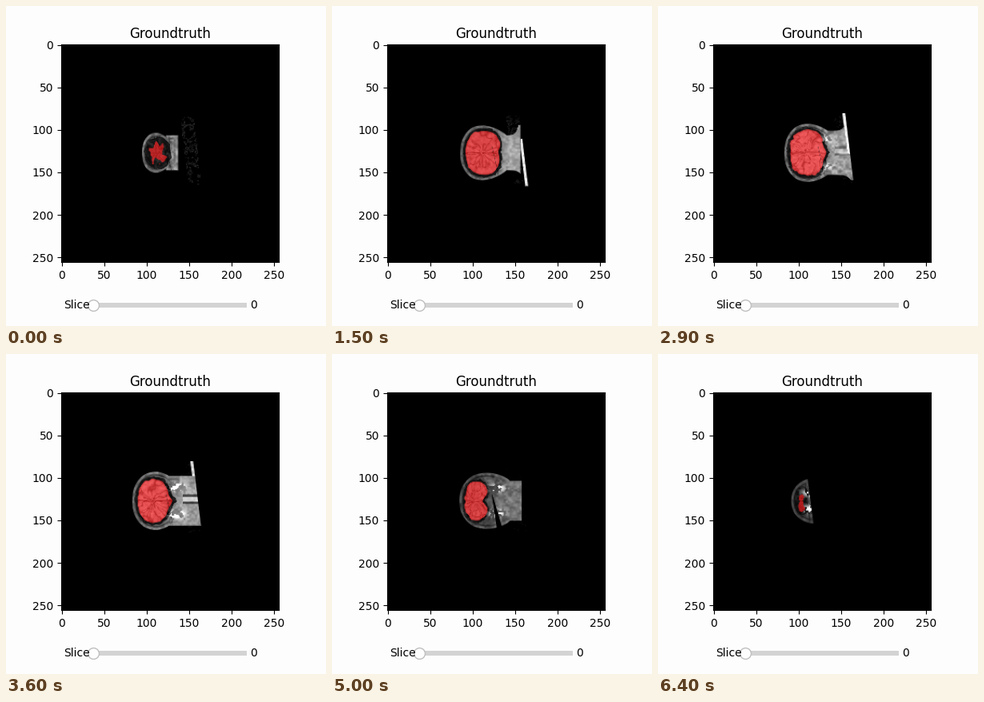
A matplotlib script that plays this animation: 400x400 px, repeating every 6.5 s.

```python
import numpy as np
import matplotlib.pyplot as plt
from matplotlib.animation import FuncAnimation
from matplotlib.patches import Rectangle

FRAMES, STEP = 65, 100
N, SCALE, LEFT, TOP = 256, 272 / 256, 69, 48      # image grid on the stage
MID = 183.5                                       # y of the symmetry line
PAPER = "#fdfdfd"

X, Y = np.meshgrid(LEFT + (np.arange(N) + .5) * SCALE,
                   TOP + (np.arange(N) + .5) * SCALE)
BOX = (slice(76, 172), slice(80, 172))            # the only part that changes
X, Y = X[BOX], Y[BOX]
EDGE = 234 + (Y - 135) * .124                     # slanted limit of the scan
LATTICE = np.random.default_rng(4).random((32, 32, 32))
GRAIN = np.random.default_rng(8).random((FRAMES,) + X.shape)


def ramp(t, start, end):
    u = np.clip((t - start) / (end - start), 0, 1)
    return u * u * (3 - 2 * u)


def key(t, *points):
    return np.interp(t, *zip(*points))


def soft(d):
    return np.clip(d + .5, 0, 1)


def bell(v, width):
    return np.exp(-(v / width) ** 2)


def noise(u, v, z):
    """Smooth random values on a repeating lattice."""
    cells = []
    for c in (u, v, np.full(X.shape, z)):
        i = np.floor(c).astype(int)
        f = c - i
        cells.append((i, f * f * (3 - 2 * f)))
    out = 0
    for corner in np.ndindex(2, 2, 2):
        w = 1
        for (i, f), b in zip(cells, corner):
            w = w * (f if b else 1 - f)
        out = out + w * LATTICE[tuple((i + b) % 32 for (i, f), b in zip(cells, corner))]
    return out


def oval(left, right, cx, half, power):
    """Distance inside an oval whose left and right halves differ in width."""
    dx, dy = X - cx, Y - MID
    wide = np.where(dx < 0, cx - left, right - cx)
    q = ((np.abs(dx) / wide) ** power + (np.abs(dy) / half) ** power) ** (1 / power)
    return np.hypot(dx, dy) * (1 / np.maximum(q, .01) - 1)


def neck_depth(t):
    grown, closed = ramp(t, 1000, 1900), ramp(t, 4500, 5600)
    half = 22 + 9 * ramp(t, 2100, 3500) - 14 * closed
    flare = 22 * grown * (1 - ramp(t, 2200, 3300))
    u = np.clip((X - 205) / (EDGE - 208), 0, 1)
    reach = 215 + 35 * grown - 30 * closed
    return np.minimum.reduce([half + flare * u ** 8 - np.abs(Y - MID), reach - X, X - 200])


def render(n):
    t = n * STEP
    z = t / 420
    fine = noise(X / 2.4, Y / 2.4, z * 1.6)
    mid = noise(X / 4.5 + 5.3, Y / 4.5, z)
    wide = noise(X / 10 + 9.1, Y / 10, z)
    shrink = abs(t / 3400 - 1) ** 2.8             # 1 at the start, 0 half way
    late = ramp(t, 4300, 5600)

    # outlines
    left = 158 + 12 * shrink
    right = key(t, (0, 211), (1000, 227), (2100, 238), (3600, 224), (5600, 240))
    slope = np.where(X < 190, 2.2, 1.7 + .5 * late)
    body = oval(left, right, 188 + 10 * late, 36.5 - 11.5 * shrink, slope)
    cut = 270 - 83 * ramp(t, 5500, 6400) + (Y - 155) * .13
    body = np.minimum.reduce([np.maximum(body, neck_depth(t)), EDGE - X, cut - X])

    brain_right = key(t, (0, 203), (1000, 209), (2100, 213), (3600, 203), (6400, 187))
    brain_half = key(t, (0, 17), (1000, 26), (2100, 30), (4400, 26), (5600, 23), (6400, 15))
    brain_left = left + 6.5
    cx = brain_left + .55 * (brain_right - brain_left)
    brain = oval(brain_left, brain_right, cx, brain_half, 2.4)
    notch = key(t, (0, 0), (1000, 4), (2100, 0), (3600, -5), (4400, 8), (5600, 4))
    brain = brain - notch * bell(Y - MID, 6) * (X > cx) + (mid - .5) * 2.5

    # scalp, skull and neck
    tissue = .5 - .2 * ramp(t, 4000, 5600)
    inner = np.clip((X - 195) / 25, 0, 1)
    gray = tissue * (.4 + .25 * inner + .5 * mid + .4 * fine)
    gray *= 1 - .5 * bell(body - 4.2, 1.1) * (1 - inner)
    gray += .2 * tissue * inner * bell(Y - MID, 22)
    gap = 3 + 3 * inner * ramp(t, 2400, 3600)
    shell = soft(brain + gap + (fine - .5) * 3)
    gray = gray * (1 - shell) + shell * (.03 + .2 * mid * fine)

    # bright spots either side of the spine
    spot_x = key(t, (2800, 208), (4400, 218), (5600, 193), (6400, 189))
    spot_y = 17 - 7 * ramp(t, 4400, 6400)
    spots = bell(X - spot_x, 9) * bell(np.abs(Y - MID) - spot_y, 4.5)
    gray += .9 * ramp(t, 2300, 3600) * spots * (fine + mid > 1)

    cord = bell(t - 3600, 800) * soft(X - 221)
    off = np.abs(Y - 181.5)
    gray *= 1 - .6 * cord * soft(6 - off)
    gray += .55 * cord * soft(3 - off)

    # dark wedge below the jaw
    wedge = ramp(t, 4600, 5500)
    drop = Y - 176
    slit = wedge * (1 + drop * .18) - np.abs(X - 200 - drop * .23)
    body = np.minimum(body, -np.minimum(slit, drop))
    gray = np.clip(gray, 0, 1) * soft(body)

    # loose specks and the bright shoulder rim
    amount = .16 * (1 - t / 6400)
    near = (X < EDGE) & (X > EDGE - 17) & (np.abs(Y - 180) < 43)
    loose = near & (fine * .6 + wide * .4 > .7 - amount)
    gray = np.maximum(gray, loose * amount * GRAIN[n])
    top = 198 - 64 * ramp(t, 1000, 2000)
    bottom = 225 - 72 * ramp(t, 2200, 3500)
    width = 3.5 * ramp(t, 300, 1300) * np.clip((Y - top) / 12 + ramp(t, 1000, 2000), 0, 1)
    rim = np.minimum.reduce([EDGE - X, X - EDGE + width, Y - top, bottom - Y])
    rim_light = (.8 + .3 * fine) * (1 - ramp(t, 3400, 4500)) * (width > .5)
    gray = np.maximum(gray, soft(rim) * rim_light)

    # red brain label over folds that run in from the surface
    dx, dy = X - cx + 3, Y - MID
    turn = np.arctan2(dy, dx) / (2 * np.pi) * 32
    rays = noise(turn + 2 * wide, np.hypot(dx, dy) / 8, z)
    folds = np.exp(-np.abs(rays - .45) / .07)
    matter = .78 - .4 * shrink - .2 * late
    matter *= 1.05 - .55 * folds + .3 * (fine - .5) - .25 * bell(dy - 3 * (wide - .5), 1.1)
    matter *= .65 + .35 * np.clip(brain / 2.5, 0, 1)
    matter = np.clip(matter, 0, 1)
    red = np.stack([.56 + .44 * matter, .41 * matter, .42 * matter], axis=2)
    patchy = 1 - ramp(t, 0, 600) + ramp(t, 5700, 6400)
    mask = soft(brain - patchy * (3 + 14 * (mid - .4))) * soft(brain) * soft(body)
    mask = mask[..., None]

    full = np.zeros((N, N, 3))
    full[BOX] = np.clip(gray, 0, 1)[..., None] * (1 - mask) + red * mask
    return np.clip(full, 0, 1)


fig, ax = plt.subplots(figsize=(4, 4), dpi=100, facecolor=PAPER)
fig.subplots_adjust(bottom=.2)
ax.set_title("Groundtruth")
picture = ax.imshow(render(0))

# slider
bar = fig.add_axes([0, 0, 1, 1])
bar.set(xlim=(0, 400), ylim=(400, 0))
bar.axis("off")
bar.add_patch(Rectangle((109, 371), 192, 6, fc="lightgrey", ec="none"))
bar.plot(109.4, 374, "o", ms=10, mfc=PAPER, mec=".75")
bar.text(105, 374, "Slice", ha="right", va="center")
bar.text(305, 374, "0", ha="left", va="center")


def update(n):
    picture.set_data(render(n))
    return [picture]


anim = FuncAnimation(fig, update, frames=FRAMES, interval=STEP, repeat=True)
plt.show()
```
